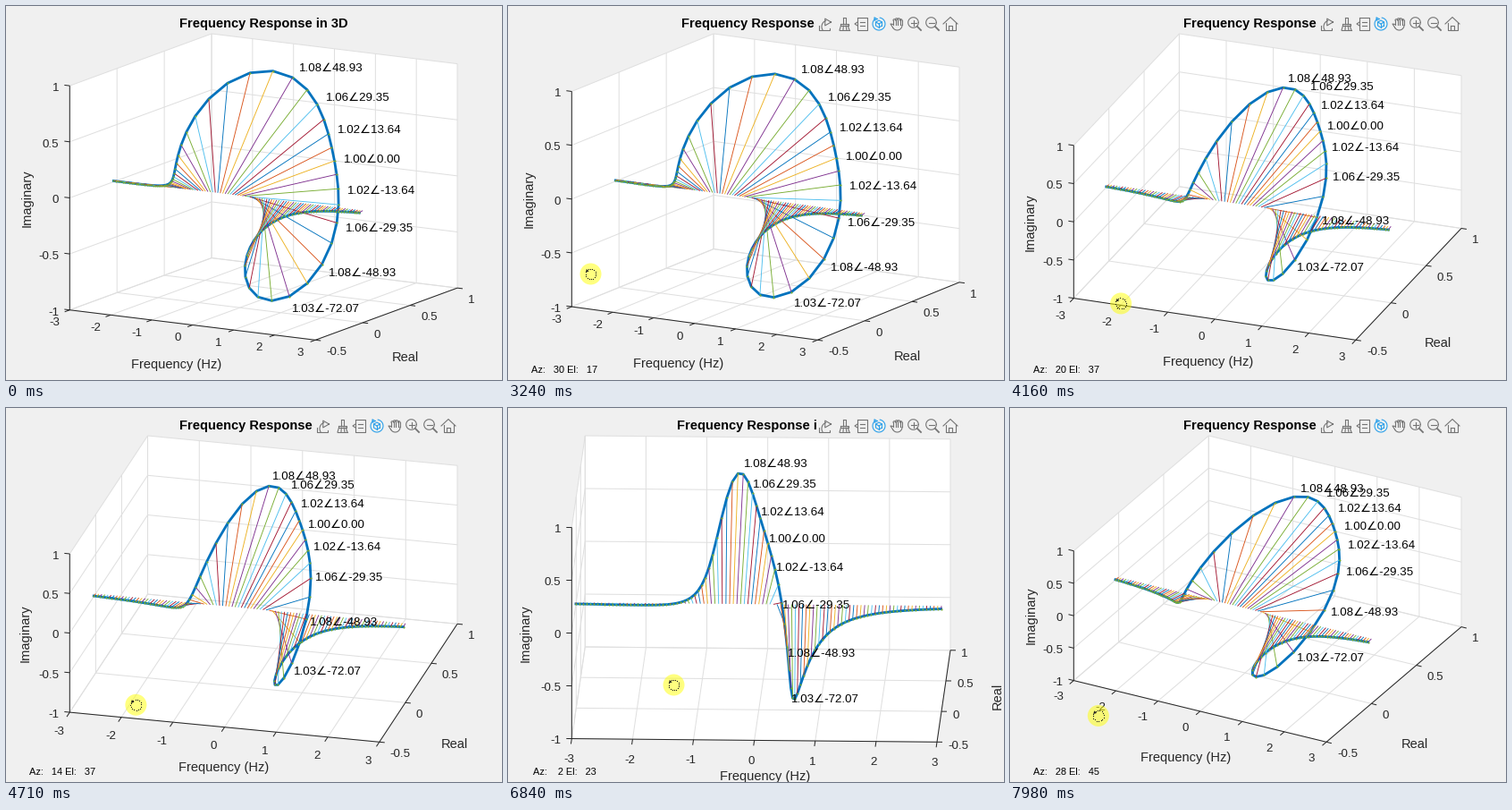
A matplotlib script for the animation above (8 s loop, 555 by 418 pixels).

```python
import math

import numpy as np
import matplotlib.pyplot as plt
from matplotlib.animation import FuncAnimation
from matplotlib.collections import LineCollection
from matplotlib.patches import Circle, Polygon, Rectangle

W, H, DPI = 555, 418, 64
STEP = 40
FRAMES = 8000 // STEP
LEFT, TOP, BOTTOM = 71.3, 31, 373.3
INK, ICON, BLUE, BACK = "#262626", "#747474", "#2ba0ea", "#f0f0f0"
CYCLE = ["#0072bd", "#d95319", "#edb120", "#7e2f8e", "#77ac30", "#4dbeee", "#a2142f"]

plt.rcParams["font.family"] = ["Liberation Sans", "DejaVu Sans"]


def pt(px):
    return px * 72 / DPI


fig = plt.figure(figsize=(W / DPI, H / DPI), dpi=DPI, facecolor=BACK)
ax = fig.add_axes([0, 0, 1, 1])
ax.set_xlim(0, W)
ax.set_ylim(H, 0)
ax.axis("off")

# ---- second order low-pass response ----
freq = (np.arange(101) - 50) * 0.06
omega = 2 * np.pi * freq
resp = 13 / (13 - omega**2 + 4j * omega)
tagged = np.arange(44, 60, 2)

X_TICKS = np.arange(-3, 4)
Y_TICKS = np.arange(-0.5, 1.1, 0.5)
Z_TICKS = np.arange(-1, 1.1, 0.5)

# ---- timing: the mouse moves in bursts, redrawn every TICK ms ----
TICK = 113
HOVER, PRESS = 980, 2680
DRAGS = [(3240, 5160), (5490, 5830), (6390, 6610), (6840, 7980)]
POSES = [(30, 17.2), (5.3, 26.9), (3.4, 25), (2.1, 23.5), (28.1, 45.2)]


def progress(t, start, end):
    steps = round((end - start) / TICK)
    return math.floor(np.clip((t - start) / (end - start), 0, 1) * steps + 1e-6) / steps


def view_at(t):
    if t < DRAGS[0][0]:
        return 30, 15
    k = max(i for i, drag in enumerate(DRAGS) if drag[0] <= t)
    p = progress(t, *DRAGS[k])
    (az0, el0), (az1, el1) = POSES[k:k + 2]
    # the first drag swings down before it comes back up
    ease, swing = (1.27, 65) if k == 0 else (1, 0)
    return az0 + (az1 - az0) * p**ease, el0 + (el1 - el0) * p + swing * p * (1 - p)


def projector(az, el, right):
    a, e = np.radians([az, el])
    ca, sa, ce, se = np.cos(a), np.sin(a), np.cos(e), np.sin(e)
    wide, tall = ca + sa, se * (ca + sa) + ce

    def project(x, y, z):
        u, v, w = (x + 3) / 6, (y + 0.5) / 1.5, (z + 1) / 2
        px = LEFT + (right - LEFT) * (ca * u + sa * v) / wide
        up = se * (ca * v - sa * u + sa) + ce * w
        return np.stack(np.broadcast_arrays(px, BOTTOM - (BOTTOM - TOP) * up / tall), -1)

    return project


# ---- plot artists ----
def add_lines(width, colors, z):
    lines = LineCollection([], linewidths=pt(width), colors=colors, zorder=z)
    ax.add_collection(lines)
    return lines


def add_text(s="", size=13.33, color=INK, ha="center", va="baseline", **kw):
    return ax.text(0, 0, s, fontsize=pt(size), color=color, ha=ha, va=va, zorder=8, **kw)


def place(text, x, mid):
    text.set_position((x, mid + 0.36 * text.get_fontsize() * DPI / 72))


walls = Polygon(np.zeros((6, 2)), fc="white", ec="none", zorder=1)
ax.add_patch(walls)
grid = add_lines(1, "#dfdfdf", 2)
frame = add_lines(1, INK, 3)
curve, = ax.plot([], [], color=CYCLE[0], lw=pt(2.8), solid_joinstyle="round", zorder=4)
stems = add_lines(0.9, [CYCLE[(i + 1) % 7] for i in range(101)], 5)
tips, = ax.plot([], [], "o", color=CYCLE[4], ms=pt(2.1), mew=0, zorder=6)

tags = [add_text(f"{abs(h):.2f}∠{np.degrees(np.angle(h)) + 0.0:.2f}", color="black", ha="left")
        for h in resp[tagged] + 0.0]
x_nums = [add_text(f"{v:g}") for v in X_TICKS]
y_nums = [add_text(f"{v:g}", ha="left") for v in Y_TICKS]
z_nums = [add_text(f"{v:g}", ha="right") for v in Z_TICKS]
x_name = add_text("Frequency (Hz)", 14.67)
y_name = add_text("Real", 14.67, va="center")
z_name = add_text("Imaginary", 14.67, va="center", rotation=90)
title = add_text("Frequency Response in 3D", 14.67, "black", weight="bold")
readout = add_text("", 11, "black")

# ---- toolbar, icons 20 px apart ----
toolbar = [ax.add_patch(Rectangle((346, 10), 160, 19, fc=BACK, ec="none", zorder=10))]


def stroke(cx, pts, color=ICON, width=1.1):
    xs, ys = np.array(pts, float).T
    toolbar.extend(ax.plot(cx + xs, 20 + ys, color=color, lw=pt(width), zorder=11))


def turn(r, a0, a1, n=30, dx=0, dy=0):
    a = np.radians(np.linspace(a0, a1, n + 1))
    return np.c_[dx + r * np.cos(a), dy + r * np.sin(a)]


def box(x0, y0, x1, y1):
    return [(x0, y0), (x1, y0), (x1, y1), (x0, y1), (x0, y0)]


EXPORT, BRUSH, TIP, ROTATE, HAND, ZOOM_IN, ZOOM_OUT, HOME = 355 + 20 * np.arange(8)

stroke(EXPORT, [(-7, 2), (-7, 7), (5, 7), (5, 5)])
stroke(EXPORT, turn(7, 150, 250, dx=3, dy=3))
stroke(EXPORT, turn(4.5, 0, 360, 3, dx=2, dy=-2))

stroke(BRUSH + 1, box(-1, -7, 2, 0))
stroke(BRUSH + 1, box(-4, 0, 5, 2))
for x in (-5, -1, 3, 6):
    stroke(BRUSH + 1, [(0.7 * x, 2), (x, 7)])
stroke(BRUSH + 1, [(-5, 7), (6, 7)])

stroke(TIP, box(-4, -7, 7, 7))
stroke(TIP, [(-4, -2), (-7, 0), (-4, 2)])
for y in (-2.5, 2):
    stroke(TIP, [(-1, y), (4, y)])

stroke(ROTATE, turn(7, -80, 230), BLUE)
stroke(ROTATE, turn(2, 0, 360, 3, dx=-4, dy=-5.5), BLUE)
stroke(ROTATE, turn(4, 30, 390, 6), BLUE)
for a in (90, 210, 330):
    stroke(ROTATE, [(0, 0), turn(4, a, a, 1)[0]], BLUE)

stroke(HAND, turn(5.5, 0, 150, dx=0.5, dy=1.5))
stroke(HAND, [(-4.3, 4.2), (-7, 0), (-4, 0.5)])
for k in range(5):
    stroke(HAND, [(2.5 * k - 4, -6 + abs(k - 2)), (2.5 * k - 4, 1)])
for k in range(4):
    stroke(HAND, turn(1.25, 180, 360, dx=2.5 * k - 2.75, dy=-5.5 + abs(k - 1.5)))

for cx in (ZOOM_IN, ZOOM_OUT):
    stroke(cx, turn(5.8, 0, 360, dx=-1.5, dy=-1.5))
    stroke(cx, [(3, 3), (7, 7)], width=1.8)
    stroke(cx, [(-4.5, -1.5), (1.5, -1.5)])
stroke(ZOOM_IN, [(-1.5, -4.5), (-1.5, 1.5)])

stroke(HOME, [(-8, 0), (0, -7.5), (8, 0)])
stroke(HOME, [(-5.5, -1.5), (-5.5, 7), (5.5, 7), (5.5, -1.5)])
stroke(HOME, box(-2, 2, 2, 7))

# ---- pointer ----
press = Circle((0, 0), 12, fc="#ffff00", alpha=0.5, ec="none", zorder=12)
ax.add_patch(press)
ring, = ax.plot([], [], "s", color="#202020", ms=pt(1.1), mew=0, zorder=13)
barb = Polygon(np.zeros((3, 2)), fc="#202020", ec="none", zorder=13)
ax.add_patch(barb)
RING = turn(6, -120, 200, 14)
BARB = turn(2.2, 15, 255, 2, dx=-4, dy=-3.5)


def unit(v):
    return v / np.hypot(*v)


def set_view(az, el):
    narrow = az < 4
    right = 495 if narrow else 505
    P = projector(az, el, right)

    def path(*corners):
        return np.array([P(*c) for c in corners])

    origin, corner, far = path((-3, -0.5, -1), (3, -0.5, -1), (3, 1, -1))
    top, back, back_top = path((-3, -0.5, 1), (-3, 1, 1), (3, 1, 1))
    walls.set_xy([origin, corner, far, back_top, back, top])
    grid.set_segments(
        [path((v, -0.5, -1), (v, 1, -1), (v, 1, 1)) for v in X_TICKS]
        + [path((3, v, -1), (-3, v, -1), (-3, v, 1)) for v in Y_TICKS]
        + [path((-3, -0.5, v), (-3, 1, v), (3, 1, v)) for v in Z_TICKS])

    out_x, out_y = unit(corner - far), unit(corner - origin)
    lines = [np.array([top, origin, corner, far])]

    def number(p, out, num, dx, dy):
        lines.append(np.array([p, p + 6 * out]))
        place(num, p[0] + dx, p[1] + dy)

    for v, num in zip(X_TICKS, x_nums):
        number(P(v, -0.5, -1), out_x, num, -17 * min(1, -1.3 * out_x[0]), 8 + 14 * out_x[1])
    for v, num in zip(Y_TICKS, y_nums):
        number(P(3, v, -1), out_y, num, 12, 12 * min(1, 25 * out_y[1]))
    for v, num in zip(Z_TICKS, z_nums):
        number(P(-3, -0.5, v), -out_y, num, -12, 1)
    frame.set_segments(lines)

    pts = P(freq, resp.real, resp.imag)
    curve.set_data(*pts.T)
    tips.set_data(*pts.T)
    stems.set_segments(np.stack([P(freq, 0, 0), pts], 1))
    spots = 1.1 * resp[tagged]
    for tag, (x, y) in zip(tags, P(freq[tagged], spots.real, spots.imag)):
        place(tag, x, y + 1.5)

    x, y = (origin + corner) / 2
    place(x_name, x + 14.5 - 1.08 * az, y + 38.5 + 0.01 * az * el)
    x, y = (corner + far) / 2
    y_name.set_rotation(90 if narrow else 0)
    y_name.set_position((x + 60, y) if narrow else
                        (x + 58 - 1.24 * az, y + 34 + 0.26 * (corner[1] - far[1])))
    z_name.set_position((19 + 5 * min(1, az / 25), (origin[1] + top[1]) / 2))
    place(title, (LEFT + right) / 2, 19)


def set_pointer(t, az, el):
    if t < PRESS:
        p = progress(t, HOVER, HOVER + 800)
        p = p * p * (3 - 2 * p)
        x, y = 79 + 15 * p, 395 - 100 * p
    else:
        x, y = 92.5 + (30 - az) / 0.3, 296 + (el - 15) / 0.63
    press.center = (x, y)
    ring.set_data(*(RING + [x, y]).T)
    barb.set_xy(BARB + [x, y])
    for part in (ring, barb):
        part.set_visible(t >= HOVER)
    press.set_visible(t >= PRESS)


def update(i):
    t = (i + 0.5) * STEP
    az, el = view_at(t)
    set_view(az, el)
    set_pointer(t, az, el)
    for part in toolbar:
        part.set_visible(t >= HOVER)
        part.set_alpha(np.clip((t - HOVER + 100) / 300, 0, 1))
    dragged = t >= DRAGS[0][0]
    readout.set_text(f"Az: {int(az):4d} El: {int(el):4d}" if dragged else "")
    place(readout, 63.5, 406)
    return []


anim = FuncAnimation(fig, update, frames=FRAMES, interval=STEP, repeat=True,
                     repeat_delay=0, blit=False)
plt.show()
```
